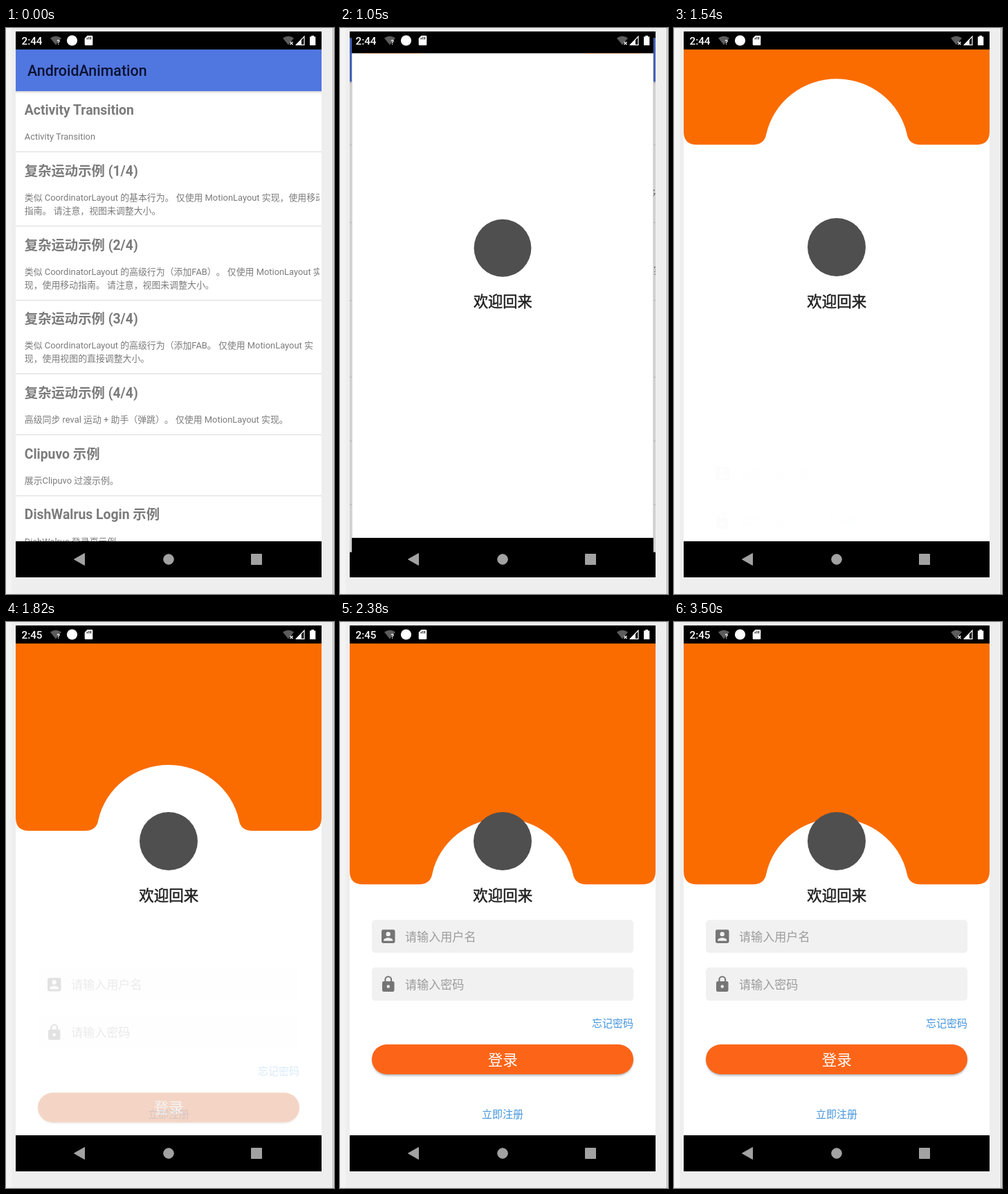
These frames come from a looping animation (474 px wide and 816 px high, 3570 ms). An HTML page:

```html
<!DOCTYPE html>
<html lang="zh-CN">
<head>
<meta charset="utf-8">
<title>Login transition</title>
<style>
  html, body { margin: 0; width: 100%; height: 100%; overflow: hidden; background: #eee; }
  svg { display: block; width: 474px; height: 816px; }
  text { font-family: Roboto, "Noto Sans CJK SC", "Noto Sans CJK", sans-serif; text-spacing-trim: space-all; white-space: pre; }
  .bar { font-size: 21.4px; font-weight: 500; fill: #0b1231; }
  .title { font-size: 19.35px; font-weight: 700; fill: #7b7b7b; }
  .desc { font-size: 12.9px; fill: #7b7b7b; }
  .welcome { font-size: 21.5px; font-weight: 500; fill: #202020; stroke: #202020; stroke-width: .5px; }
  .hint { font-size: 17.1px; fill: #9c9c9c; }
  .link { font-size: 15px; fill: #4494dd; }
  .mid { text-anchor: middle; }
</style>
</head>
<body>
<svg viewBox="0 0 474 816">
  <defs>
    <clipPath id="screen"><rect x="14" y="5" width="442" height="787"/></clipPath>
    <clipPath id="content"><rect x="14" y="31" width="442" height="709"/></clipPath>
    <clipPath id="listArea"><rect x="14" y="91" width="439" height="649"/></clipPath>
    <filter id="soft" x="-5%" y="-20%" width="110%" height="150%"><feGaussianBlur stdDeviation="1.6"/></filter>
    <linearGradient id="drop" x2="0" y2="1">
      <stop stop-color="#000" stop-opacity=".16"/><stop offset="1" stop-color="#000" stop-opacity="0"/>
    </linearGradient>
  </defs>

  <!-- device frame -->
  <rect width="474" height="816" fill="#eee"/>
  <rect width="8" height="816" fill="#f3f3f3"/>
  <rect x="472" width="1" height="816" fill="#a5a5a5"/>

  <g clip-path="url(#screen)">
    <g id="home">
      <rect x="14" y="5" width="442" height="787"/>
      <rect x="14" y="31" width="442" height="709" fill="#fff"/>
      <g id="list"></g>
      <rect x="14" y="740" width="442" height="52"/>
      <rect x="14" y="31" width="442" height="60" fill="#5076e0"/>
      <rect x="14" y="91" width="442" height="4" fill="url(#drop)"/>
      <text class="bar" x="31" y="69">AndroidAnimation</text>
    </g>
    <rect id="dim" x="14" y="5" width="442" height="787"/>

    <g id="login">
      <rect x="14" y="5" width="442" height="787"/>
      <g clip-path="url(#content)">
        <rect x="14" y="31" width="442" height="709" fill="#fff"/>
        <path id="wave" fill="#fa6c00" d="M14-420H456V-19Q456 0 437 0H356Q339 0 336.5-16A104 101 0 0 0 133.5-16Q131 0 114 0H33Q14 0 14-19Z"/>
        <circle cx="235" cy="316" r="42" fill="#4f4f4f"/>
        <text class="welcome mid" x="235.3" y="402">欢迎回来</text>
        <text id="signup" class="link mid" x="235" y="714.5">立即注册</text>
        <rect id="shade" x="46" y="609" width="378" height="43" rx="21.5"/>
        <g id="form">
          <g id="fields" fill="#f1f1f1">
            <rect x="46" y="429.5" width="378" height="47.5" rx="5"/>
            <rect x="46" y="498" width="378" height="48" rx="5"/>
          </g>
          <rect x="60" y="443.5" width="19.5" height="19.5" rx="2.4" fill="#757575"/>
          <circle cx="69.7" cy="449.9" r="3.2" fill="#f1f1f1"/>
          <path d="M63.2 459.8V458.7C63.2 456.5 67.5 455.3 69.7 455.3S76.2 456.5 76.2 458.7V459.8Z" fill="#f1f1f1"/>
          <rect x="61" y="518" width="17.5" height="15" rx="2.3" fill="#757575"/>
          <path d="M65.4 519V515.6a4.35 4.35 0 0 1 8.7 0V519" fill="none" stroke="#757575" stroke-width="2.1"/>
          <circle cx="69.75" cy="525.5" r="2.2" fill="#f1f1f1"/>
          <text class="hint" x="94" y="460">请输入用户名</text>
          <text class="hint" x="94" y="529">请输入密码</text>
          <text class="link" x="364" y="583.5">忘记密码</text>
          <rect x="46.5" y="611" width="377" height="43" rx="21.5" opacity=".3" filter="url(#soft)"/>
          <rect x="46" y="609" width="378" height="43" rx="21.5" fill="#fc6518"/>
          <text class="mid" x="235.3" y="638.5" font-size="21.5" fill="#fff">登录</text>
        </g>
      </g>
    </g>

    <!-- status icons and navigation keys -->
    <g fill="#fff">
      <text id="clock" x="22.5" y="24" font-size="15.2" font-weight="500"></text>
      <path d="M64 14.5Q72 9 80 14.5L72 24.5Z" fill="#5c5c5c"/>
      <text x="73.5" y="24" font-size="9" font-weight="700">?</text>
      <circle cx="95.5" cy="18" r="7.6"/>
      <path d="M117.5 11H124a1.3 1.3 0 0 1 1.3 1.3V23.7a1.3 1.3 0 0 1-1.3 1.3H115a1.3 1.3 0 0 1-1.3-1.3V15Z"/>
      <path d="M117.3 14v2.6M119.9 13v3.6M122.5 13v3.6" stroke="#000" stroke-width="1.1"/>
      <path d="M400 14.5Q408 9 416 14.5L408 24.5Z" fill="#5c5c5c"/>
      <path d="M410.5 20l4 4m0-4l-4 4" stroke="#fff" stroke-width="1.3"/>
      <path d="M419.5 24.3H431V12.3Z" fill="none" stroke="#fff" stroke-width="1.2"/>
      <path d="M418.5 24.5L427 16V24.5Z"/>
      <path d="M441.3 11h3.7v1.5h2.3V25h-8.3V12.5h2.3Z"/>
    </g>
    <g fill="#a2a2a2" stroke="#a2a2a2" stroke-linejoin="round">
      <path d="M98.5 766L113.5 757.5V774.5Z"/>
      <circle cx="235" cy="766" r="7.3"/>
      <rect x="354.5" y="758.5" width="15" height="15"/>
    </g>
  </g>
</svg>

<script>
const LOOP = 3570, STEP = 70;
const $ = id => document.getElementById(id);

const rows = [
  ["Activity Transition", "Activity Transition"],
  ["复杂运动示例 (1/4)", "类似 CoordinatorLayout 的基本行为。 仅使用 MotionLayout 实现，使用移动", "指南。 请注意，视图未调整大小。"],
  ["复杂运动示例 (2/4)", "类似 CoordinatorLayout 的高级行为（添加FAB）。 仅使用 MotionLayout 实", "现，使用移动指南。 请注意，视图未调整大小。"],
  ["复杂运动示例 (3/4)", "类似 CoordinatorLayout 的高级行为（添加FAB。 仅使用 MotionLayout 实", "现，使用视图的直接调整大小。"],
  ["复杂运动示例 (4/4)", "高级同步 reval 运动 + 助手（弹跳）。 仅使用 MotionLayout 实现。"],
  ["Clipuvo 示例", "展示Clipuvo 过渡示例。"],
  ["DishWalrus Login 示例", "DishWalrus 登录页示例。"]
];

function buildList() {
  const line = (cls, y, s) => `<text class="${cls}" x="26.8" y="${y}">${s}</text>`;
  let y = 91, text = "", rules = "";
  for (const [title, ...desc] of rows) {
    text += line("title", y + 34.2, title);
    desc.forEach((s, i) => text += line("desc", y + 70.3 + i * 19, s));
    y += desc.length > 1 ? 106.7 : 87.7;
    rules += `<rect x="14" y="${Math.round(y - .5)}" width="442" height="1" fill="#dadada"/>`;
  }
  $("list").innerHTML = `<g clip-path="url(#listArea)">${text}</g>${rules}`;
}

// [time, value] steps, linear in between
const openSteps = [[840, 0], [910, .06], [980, .7], [1050, .907], [1120, .965], [1190, .985], [1260, .996], [1330, 1]];
const restSteps = [[1960, 28], [2030, 15], [2100, 8], [2170, 4], [2240, 2], [2310, 1], [2380, 0]];
const fadeSteps = [[1400, 0], [1540, .01], [1680, .09], [1820, .2], [1960, .65], [2030, .82], [2100, .91], [2240, .98], [2380, 1]];

function at(t, steps) {
  if (t <= steps[0][0]) return steps[0][1];
  for (let i = 1; i < steps.length; i++) {
    const [t0, a] = steps[i - 1], [t1, b] = steps[i];
    if (t <= t1) return a + (b - a) * (t - t0) / (t1 - t0);
  }
  return steps[steps.length - 1][1];
}

// distance the wave still has to fall
function remaining(t) {
  if (t >= 1960) return at(t, restSteps);
  const p = Math.max(0, (t - 1064) / 1100);
  return 347 * (1 + Math.cos(Math.PI * p)) / 2;
}

const zoom = (s, x, y) => `translate(${x} ${y}) scale(${s}) translate(${-x} ${-y})`;
const set = (id, name, value) => $(id).setAttribute(name, value);

function draw(t) {
  const open = at(t, openSteps), left = remaining(t), fade = at(t, fadeSteps);
  const drop = `translate(0 ${left * .9})`;
  set("home", "transform", zoom(1 + .05 * open, 235, 391));
  set("dim", "opacity", .2 * open);
  set("login", "transform", zoom(.85 + .15 * open, 235, 405));
  set("login", "visibility", t < 980 ? "hidden" : "visible");
  set("wave", "transform", `translate(0 ${378.2 - left})`);
  set("form", "transform", drop);
  set("form", "opacity", fade);
  set("fields", "opacity", fade);
  set("shade", "transform", drop);
  set("shade", "opacity", Math.min(.05, fade * .25));
  set("signup", "opacity", fade);
  $("clock").textContent = t < 1680 ? "2:44" : "2:45";
}

buildList();
const start = performance.now();
function tick() {
  const t = (performance.now() - start) % LOOP;
  draw(Math.floor(t / STEP) * STEP);
  requestAnimationFrame(tick);
}
tick();
</script>
</body>
</html>
```
